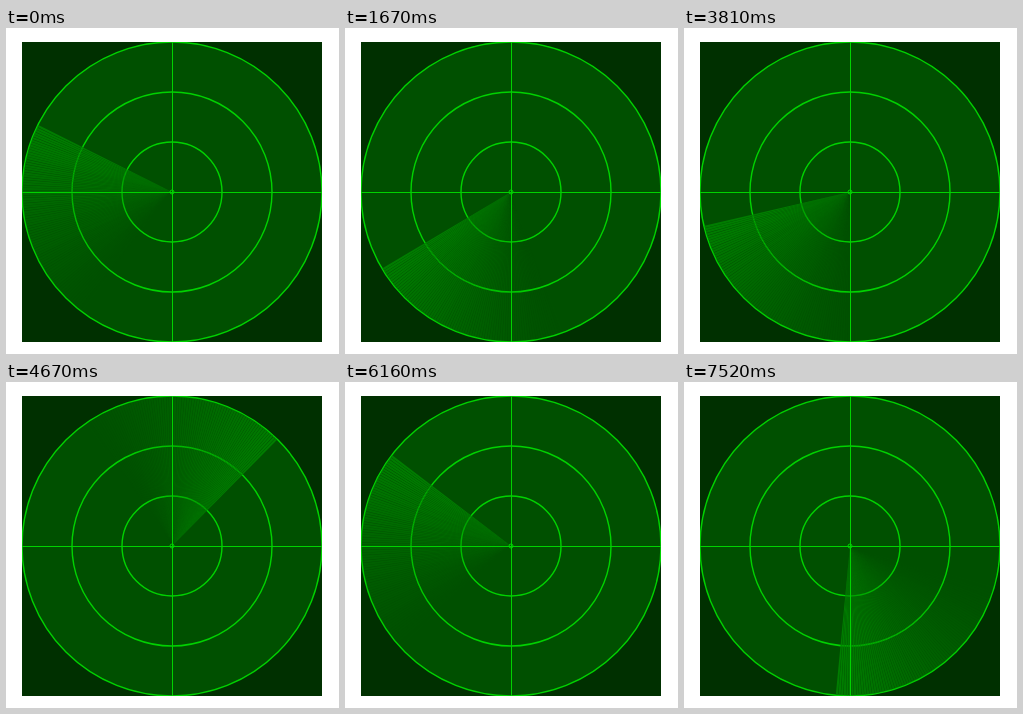
An HTML page that plays this animation: 333 px wide and 326 px high, repeating every 7560 ms.

```html
<!DOCTYPE html>
<html lang="en">
<head>
<meta charset="utf-8">
<title>Radar sweep</title>
<style>
  html, body { margin: 0; width: 100%; height: 100%; overflow: hidden; background: #fff; }
  svg { display: block; width: 333px; height: 326px; }
</style>
</head>
<body>
<svg viewBox="0 0 333 326">
  <clipPath id="screen"><rect x="16" y="14" width="300" height="300"/></clipPath>
  <g clip-path="url(#screen)">
    <rect x="16" y="14" width="300" height="300" fill="#003000"/>
    <circle cx="166" cy="164" r="150" fill="#005000"/>
    <g fill="none" stroke="#00d200" stroke-width="1.4">
      <circle cx="166" cy="164" r="150"/>
      <circle cx="166" cy="164" r="100"/>
      <circle cx="166" cy="164" r="50"/>
    </g>
    <g id="sweep" fill="#008200"></g>
    <g fill="none" stroke="#00d200">
      <circle cx="166" cy="164" r="2"/>
      <path d="M166.5 14V314M16 164.5H316"/>
    </g>
  </g>
</svg>
<script>
const LOOP = 7560;
const DELAY = 26.5, TICK = 46.7;               // ms before the first step, ms per step
const REST = 206.6, FIRST = 222, STEP = 8.209; // degrees, clockwise from the right
const TAIL = 80, RADIUS = 149.5, WEDGE = 0.85;

const sweep = document.getElementById("sweep");

function rim(deg) {
  const a = deg * Math.PI / 180;
  return (RADIUS * Math.cos(a)).toFixed(3) + " " + (RADIUS * Math.sin(a)).toFixed(3);
}

// The tail is a fan of thin wedges, one per degree, fading behind the leading edge.
for (let i = 0; i < TAIL; i++) {
  const wedge = document.createElementNS("http://www.w3.org/2000/svg", "path");
  wedge.setAttribute("d", `M0 0L${rim(-i)}L${rim(-i - WEDGE)}Z`);
  wedge.setAttribute("fill-opacity", (0.92 * Math.pow(1 - i / TAIL, 1.3)).toFixed(3));
  sweep.appendChild(wedge);
}

// The beam rests briefly, then turns in equal steps.
function angleAt(t) {
  const step = Math.floor((t - DELAY) / TICK);
  return step < 0 ? REST : FIRST + STEP * step;
}

function draw(t) {
  sweep.setAttribute("transform", `translate(166 164) rotate(${(angleAt(t) % 360).toFixed(2)})`);
}

const begin = performance.now();
function tick() {
  draw((performance.now() - begin) % LOOP);
  requestAnimationFrame(tick);
}
draw(0);
requestAnimationFrame(tick);
</script>
</body>
</html>
```
